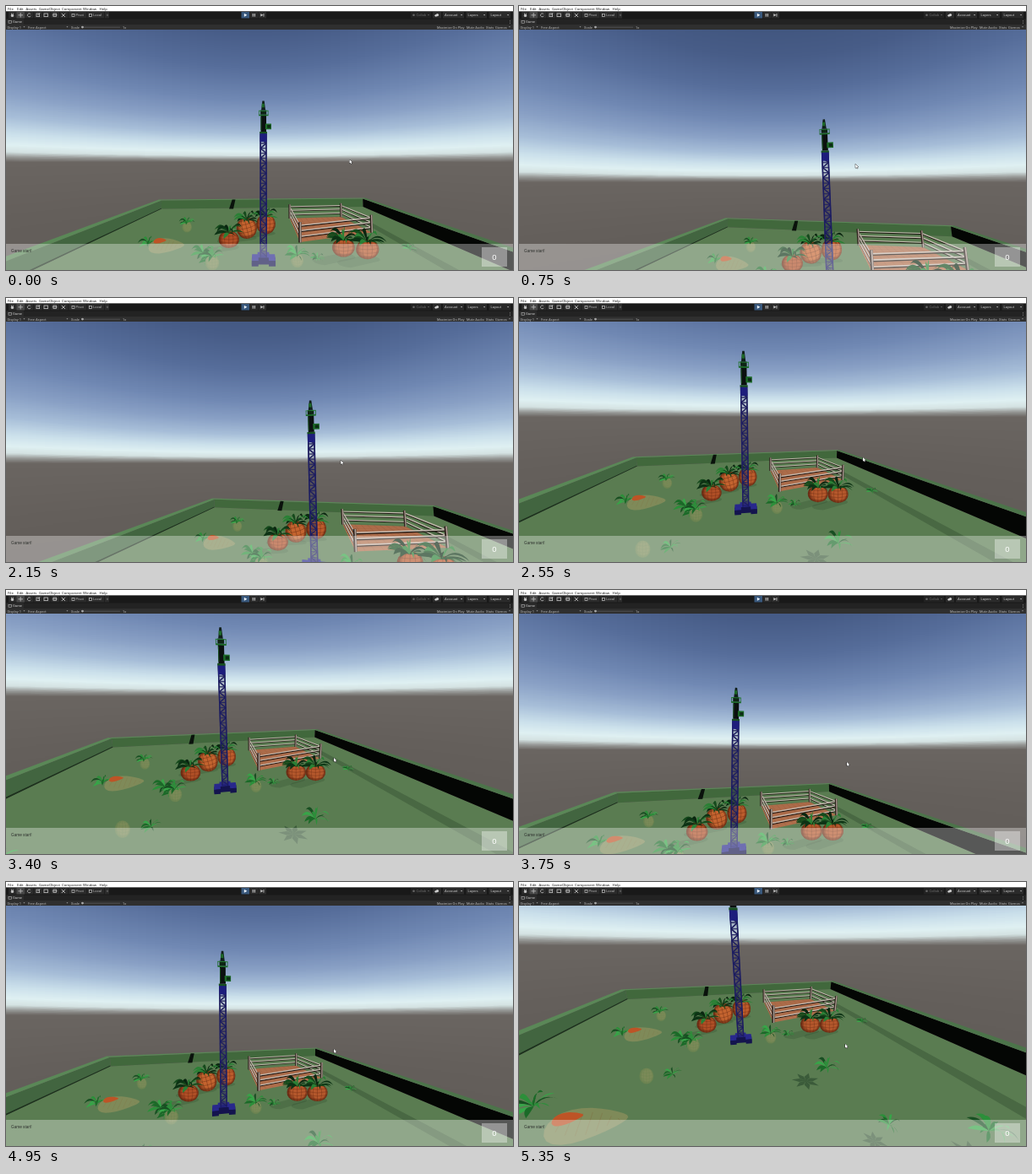
Write an HTML page with a canvas that moves like this. It is 600 px wide and 313 px high and loops after 5.4 s.

```html
<!DOCTYPE html>
<html lang="en">
<head>
<meta charset="utf-8">
<title>Crane game</title>
<style>
html, body { margin: 0; width: 100%; height: 100%; overflow: hidden; background: #191919; }
canvas { display: block; }
</style>
</head>
<body>
<canvas id="stage" width="600" height="313"></canvas>
<script>
const ctx = document.getElementById('stage').getContext('2d');
const LOOP = 5400, STEP = 50, TOP = 28;
const FOCAL = 246.8, CX = 300, CY = 170.5, EYE = 10, TAU = Math.PI * 2;
const RAD = Math.PI / 180;

// ---- motion ----
const times = [0, 1750, 2550, 3400, 4100, 4950, 5350];
const yaws = [0, -33.6, 8.7, 11, 11.2, 11, 10.5];
const pitches = [3.4, 17.2, -6.8, -10.2, 19, -2.9, -21.1];
const mouseX = [406.5, 385.5, 407, 388, 388, 388, 386];
const mouseY = [182, 196, 189, 199, 207, 198, 192];

function track(vals) {
  const last = times.length - 1;
  const rate = i => (vals[i + 1] - vals[i]) / (times[i + 1] - times[i]);
  const slope = vals.map((v, i) => {
    if (!i || i === last) return i ? rate(i - 1) : 0;
    const a = rate(i - 1), b = rate(i);
    return a * b <= 0 ? 0 : 2 * a * b / (a + b);
  });
  return t => {
    if (t >= times[last]) return vals[last];
    let i = 0;
    while (t >= times[i + 1]) i++;
    const h = times[i + 1] - times[i], u = (t - times[i]) / h, w = 1 - u;
    return vals[i] * (1 + 2 * u) * w * w + vals[i + 1] * u * u * (3 - 2 * u)
      + h * u * w * (slope[i] * w - slope[i + 1] * u);
  };
}
const yawAt = track(yaws), pitchAt = track(pitches);
const curX = track(mouseX), curY = track(mouseY);

// ---- camera ----
let sinY, cosY, sinP, cosP;
function aim(yaw, pitch) {
  sinY = Math.sin(yaw * RAD); cosY = Math.cos(yaw * RAD);
  sinP = Math.sin(pitch * RAD); cosP = Math.cos(pitch * RAD);
}
function toCam([x, y, z]) {
  const f = x * sinY + z * cosY, h = y - EYE;
  return [x * cosY - z * sinY, h * cosP - f * sinP, f * cosP + h * sinP];
}
const toScreen = c => [CX + FOCAL * c[0] / c[2], CY - FOCAL * c[1] / c[2]];
const project = p => toScreen(toCam(p));

function clipNear(pts) {
  const near = 0.3, out = [];
  pts.forEach((a, i) => {
    const b = pts[(i + 1) % pts.length];
    if (a[2] >= near) out.push(a);
    if ((a[2] >= near) !== (b[2] >= near)) {
      const k = (near - a[2]) / (b[2] - a[2]);
      out.push(a.map((v, j) => v + (b[j] - v) * k));
    }
  });
  return out;
}
function poly(pts, fill) {
  const c = clipNear(pts.map(toCam));
  if (c.length < 3) return;
  ctx.fillStyle = fill;
  ctx.beginPath();
  c.forEach(p => ctx.lineTo(...toScreen(p)));
  ctx.fill();
}
function line(a, b, width, color) {
  const ca = toCam(a), cb = toCam(b);
  if (ca[2] < 1 || cb[2] < 1) return;
  ctx.strokeStyle = color;
  ctx.lineWidth = width * FOCAL * 2 / (ca[2] + cb[2]);
  ctx.beginPath();
  ctx.moveTo(...toScreen(ca));
  ctx.lineTo(...toScreen(cb));
  ctx.stroke();
}

// ---- sky: elevation in degrees, then red, green, blue ----
const skyStops = [
  [-60, 84, 79, 75], [-10, 100, 95, 91], [0, 106, 101, 97], [0.9, 150, 152, 150],
  [1.8, 212, 226, 226], [3, 223, 240, 242], [5, 203, 224, 235], [8, 167, 190, 216],
  [12, 137, 160, 197], [17, 112, 136, 179], [25, 86, 109, 154], [33, 71, 92, 135],
  [50, 56, 76, 113], [90, 48, 64, 98]
];
const skyTable = Array.from({ length: 1501 }, (_, k) => {
  const e = k / 10 - 60;
  let i = 0;
  while (i < skyStops.length - 2 && e > skyStops[i + 1][0]) i++;
  const a = skyStops[i], b = skyStops[i + 1], u = (e - a[0]) / (b[0] - a[0]);
  return [1, 2, 3].map(j => a[j] + (b[j] - a[j]) * u);
});
const skyCanvas = document.createElement('canvas');
skyCanvas.width = 60;
skyCanvas.height = 285;
const skyCtx = skyCanvas.getContext('2d');
const skyData = skyCtx.createImageData(60, 285);

function drawSky() {
  const d = skyData.data;
  for (let y = 0, n = 0; y < 285; y++) {
    const b = (CY - TOP - y - 0.5) / FOCAL;
    for (let x = 0; x < 60; x++, n += 4) {
      const a = (x * 10 + 5 - CX) / FOCAL;
      const e = Math.asin((b * cosP + sinP) / Math.hypot(a, b, 1)) / RAD;
      const c = skyTable[Math.max(0, Math.min(1500, Math.round((e + 60) * 10)))];
      d[n] = c[0]; d[n + 1] = c[1]; d[n + 2] = c[2]; d[n + 3] = 255;
    }
  }
  skyCtx.putImageData(skyData, 0, 0);
  ctx.drawImage(skyCanvas, 0, TOP, 600, 285);
}

// ---- arena ----
const L = -21, R = 23.2, BACK_L = 45.3, BACK_R = 47.4, FRONT = -12, WALL = 1.8, THICK = 1.1;
const flat = (pts, y = 0) => pts.map(([x, z]) => [x, y, z]);
const upright = (x0, z0, x1, z1, y0, y1) =>
  [[x0, y0, z0], [x1, y0, z1], [x1, y1, z1], [x0, y1, z0]];

function drawArena() {
  const lo = L - THICK, ro = R + THICK, bl = BACK_L + THICK, br = BACK_R + THICK;
  poly(flat([[L, FRONT], [L, BACK_L], [R, BACK_R], [R, FRONT]]), '#5a7c51');
  poly(flat([[17.2, FRONT], [17.2, 40], [18.5, 40], [18.5, FRONT]]), 'rgba(20,45,25,.25)');
  poly(upright(L, BACK_L, R, BACK_R, 0, WALL), '#41683c');
  poly(upright(L, FRONT, L, BACK_L, 0, WALL), '#426540');
  poly(upright(L, FRONT, L, BACK_L, 0, 0.15), '#1c2f1c');
  poly(upright(R, FRONT, R, BACK_R, 0, WALL), '#040604');
  poly(flat([[lo, FRONT], [lo, bl], [L, BACK_L], [L, FRONT]], WALL), '#5a8857');
  poly(flat([[lo, bl], [ro, br], [R, BACK_R], [L, BACK_L]], WALL), '#5a8857');
  poly(flat([[ro, FRONT], [ro, br], [R, BACK_R], [R, FRONT]], WALL), '#4c744a');
  poly([[-6.5, 0, BACK_L], [-5.6, 0, BACK_L], [-5.3, WALL, bl], [-6, WALL, bl]], '#0a120c');
}

// soft shadows fall to the front left
function shade(x, z, r, h) {
  const pts = Array.from({ length: 14 }, (_, i) => {
    const a = i / 14 * TAU, far = Math.cos(a) < 0 ? h : 0;
    return [x + Math.cos(a) * r - far * 1.3, z + Math.sin(a) * r * 0.7 - far * 0.6];
  });
  poly(flat(pts), 'rgba(22,52,32,.18)');
}

// ---- plants ----
const bright = ['#2c8f3a', '#1b6a28', '#37a548', '#184f22'];
const deep = ['#154a1c', '#0a2610', '#2a8035', '#0d3315'];

function leaves(x, y, z, size, count, colors) {
  if (toCam([x, y, z])[2] < 1) return;
  const at = (a, r, up) => project([x + Math.cos(a) * r * size, y + up * size, z + Math.sin(a) * r * size]);
  const root = project([x, y, z]);
  for (let i = 0; i < count; i++) {
    const a = i * 2.4 + x, lift = 0.45 + 0.4 * Math.sin(i * 1.9 + z);
    ctx.fillStyle = colors[i % 4];
    ctx.beginPath();
    ctx.moveTo(...root);
    ctx.quadraticCurveTo(...at(a - 0.3, 0.6, lift + 0.3), ...at(a, 1, lift * 0.4 - 0.05));
    ctx.quadraticCurveTo(...at(a + 0.3, 0.55, lift), ...root);
    ctx.fill();
  }
}

function carrot({ x, z, r, tall = 1, tilt = 0, color = '#b5582c', dark = '#5a220e', top = 1.75, tint = deep }) {
  const c = toCam([x, r * 0.85 * tall, z]);
  if (c[2] < 1) return;
  const [sx, sy] = toScreen(c), s = r * FOCAL / c[2];
  ctx.save();
  ctx.translate(sx, sy);
  ctx.rotate(tilt);
  ctx.scale(s, s * tall);
  const g = ctx.createRadialGradient(0.3, -0.2, 0.1, 0, 0, 1.05);
  g.addColorStop(0, color);
  g.addColorStop(0.6, color);
  g.addColorStop(1, dark);
  ctx.fillStyle = g;
  ctx.beginPath();
  ctx.ellipse(0, 0, 1, 0.95, 0, 0, TAU);
  ctx.fill();
  ctx.clip();
  ctx.strokeStyle = dark;
  ctx.globalAlpha = 0.45;
  ctx.lineWidth = 0.06;
  for (let i = -2; i <= 2; i++) {
    ctx.beginPath();
    ctx.moveTo(-1, i * 0.36 - 0.1);
    ctx.quadraticCurveTo(0, i * 0.36 + 0.15, 1, i * 0.36 - 0.1);
    ctx.moveTo(i * 0.24, -1);
    ctx.quadraticCurveTo(i * 0.62, 0, i * 0.24, 1);
    ctx.stroke();
  }
  ctx.restore();
  if (top) leaves(x, r * 1.5 * tall, z, top, 13, tint);
}

function lying(x, z, len) {
  const ring = (cx, rx, ry, y) => Array.from({ length: 24 }, (_, i) => {
    const a = i / 24 * TAU, c = Math.cos(a), s = Math.sin(a) * (1 - 0.45 * c);
    return [cx + c * rx, y + s * ry, z + 0.1 * c + s * ry * 1.2];
  });
  poly(ring(x, len / 2, 0.55, 0.3), '#7f8a59');
  for (let i = -3; i < 4; i++) {
    const px = x + i * len / 8, h = 0.42 - 0.04 * i * (i + 1);
    line([px, 0.3 - h, z - h], [px + 0.15, 0.3 + h, z + h], 0.035, 'rgba(125,95,50,.4)');
  }
  poly(ring(x - len * 0.2, len * 0.17, 0.2, 0.85), '#bd5426');
}

const pale = { color: '#7b8a58', dark: '#64804f', tint: bright };
const fence = [[5.05, 26.6], [5.35, 37.6], [14.85, 38.6], [15.9, 30.2]];

function drawSide(a, b) {
  for (const y of [0.75, 1.45, 2.1]) {
    line([a[0], y - 0.14, a[1]], [b[0], y - 0.14, b[1]], 0.13, '#1e1612');
    line([a[0], y, a[1]], [b[0], y, b[1]], 0.15, '#c4bab0');
  }
}
function drawPost([x, z]) {
  line([x, 0, z], [x, 2.5, z], 0.38, '#2c211c');
  line([x + 0.07, 0, z], [x + 0.07, 2.5, z], 0.18, '#a99a90');
}
function drawFence() {
  poly(flat(fence, 0.05), '#b06f4c');
  const mix = (a, b, u) => [a[0] + (b[0] - a[0]) * u, 0.06, a[1] + (b[1] - a[1]) * u];
  const [fl, bl, br, fr] = fence;
  for (let u = 0.1; u < 1; u += 0.1) {
    line(mix(fl, bl, u), mix(fr, br, u), 0.05, 'rgba(90,45,30,.3)');
    line(mix(fl, fr, u), mix(bl, br, u), 0.05, 'rgba(90,45,30,.25)');
  }
  drawSide(bl, br);
  drawSide(fl, bl);
  drawSide(br, fr);
  drawPost(bl);
  drawPost(br);
  drawSide(fl, fr);
  drawPost(fl);
  drawPost(fr);
}

// ---- crane ----
const TX = 0.4, TZ = 21.4;
function slab(x0, x1, y0, y1, color, z = TZ) {
  poly(upright(TX + x0, z, TX + x1, z, y0, y1), color);
}
function block(x0, x1, z0, z1, h) {
  poly(flat([[TX + x0, TZ + z0], [TX + x1, TZ + z0], [TX + x1, TZ + z1], [TX + x0, TZ + z1]], h), '#28288c');
  slab(x0, x1, 0, h, '#14144e', TZ + z0);
}
function drawCrane() {
  block(-0.6, 0.6, 0.2, 1, 0.6);
  block(-1.15, 1.15, -0.4, 0.4, 0.65);
  block(-1.15, -0.5, -0.75, 0.1, 0.5);
  block(0.5, 1.15, -0.75, 0.1, 0.5);
  const bays = 24, lo = 0.6, step = (13 - lo) / bays, w = 0.3;
  slab(-w, w, lo, 13, 'rgba(30,30,70,.2)');
  for (const [dz, color] of [[0.6, '#3c3c5c'], [0, '#1c1c62']]) {
    const z = TZ + dz;
    for (let i = 0; i < bays; i++) {
      const y = lo + i * step, s = i % 2 ? w : -w;
      line([TX - s, y, z], [TX + s, y + step, z], 0.1, color);
      line([TX - w, y, z], [TX + w, y, z], 0.07, color);
    }
    for (const s of [-w, w]) line([TX + s, 0.5, z], [TX + s, 13, z], 0.12, color);
  }
  slab(-0.34, 0.34, 12.1, 13, '#1d1d7c');
  slab(-0.38, 0.38, 12.95, 13.15, '#17501f');
  slab(-0.27, 0.3, 13.15, 14.9, '#0b100f');
  slab(-0.27, -0.19, 13.3, 14.7, '#17501f');
  slab(0.2, 0.82, 13.4, 13.98, '#1c6a28');
  slab(0.4, 0.75, 13.52, 13.85, '#0d2c15');
  slab(-0.48, 0.52, 14.8, 14.95, '#1c6a28');
  slab(-0.48, -0.42, 14.9, 15.35, '#1c6a28');
  slab(0.46, 0.52, 14.9, 15.35, '#1c6a28');
  slab(-0.3, 0.32, 14.95, 15.4, '#0e2414');
  slab(-0.48, 0.52, 15.3, 15.38, '#237a30');
  poly([[TX - 0.22, 15.4, TZ], [TX + 0.22, 15.4, TZ], [TX + 0.1, 16.4, TZ], [TX - 0.1, 16.4, TZ]], '#10201a');
  slab(-0.16, 0.1, 15.7, 16.1, '#1f6a2a');
}

// ---- scene, far to near ----
const big = { r: 1.2, tall: 0.9 };
const carrots = [
  { x: -3.6, z: 25.1, ...big, color: '#b04f26' },
  { x: -1.7, z: 28.2, r: 1.35, tall: 1.1, tilt: -0.25, color: '#c4642f' },
  { x: 0.9, z: 30, r: 1.35, tall: 1.1, color: '#bd5c2c' },
  { x: 8.95, z: 22.8, ...big },
  { x: 11.25, z: 22.3, ...big }
];
const buried = [
  [-7.1, 15.2, 0.55, 0], [-4.4, 20, 0.65, 1.1], [-10.4, 30.5, 0.7, 1.1], [3.6, 20.5, 0.6, 1.2]
];
const sprouts = [
  [-6, 22.8, 1.3], [-5.3, 15.5, 0.7], [5.8, 21.5, 0.75], [16.8, 24, 0.8],
  [-13.2, 13.3, 1.2], [-13.2, 25.4, 1.1], [-5, 21.2, 1]
];
const casting = [[7.3, 14.1, 1.1], [8.3, 7.8, 0.65], [13.5, 6.4, 1.05]];
const scene = [
  { z: 32, draw: drawFence },
  { z: TZ, draw: drawCrane },
  { z: 24.9, draw: () => lying(-10.8, 24.9, 4) },
  { z: 11.1, draw: () => lying(-8.9, 11.1, 4.2) },
  ...carrots.map(c => ({ z: c.z, draw: () => carrot(c) })),
  ...buried.map(([x, z, r, top]) => ({ z, draw: () => carrot({ ...pale, x, z, r, tall: 1.2, top }) })),
  ...[...sprouts, ...casting].map(([x, z, s]) => ({ z, draw: () => leaves(x, 0.3, z, s, 11, bright) }))
].sort((a, b) => b.z - a.z);

function drawShadows() {
  carrots.forEach(c => shade(c.x, c.z, c.r, 1.8));
  casting.forEach(([x, z, s]) => {
    const px = x - 2 * s, pz = z - 0.9 * s;
    for (let i = 0; i < 7; i++) {
      const a = i * TAU / 7 + x, q = k => [px + Math.cos(a + k) * s * 0.5, pz + Math.sin(a + k) * s * 0.5];
      poly(flat([[px, pz], q(-0.4), [px + Math.cos(a) * s, pz + Math.sin(a) * s], q(0.4)]), 'rgba(22,52,32,.45)');
    }
  });
}

// ---- interface ----
function rect(x, y, w, h, fill) {
  ctx.fillStyle = fill;
  ctx.fillRect(x, y, w, h);
}
function text(str, x, y, size = 4.1, color = '#b4b4b4', family = 'Roboto, sans-serif') {
  ctx.font = size + 'px ' + family;
  ctx.fillStyle = color;
  ctx.fillText(str, x, y);
}
function tri(x, y, w, h, color) {
  ctx.fillStyle = color;
  ctx.beginPath();
  ctx.moveTo(x, y);
  ctx.lineTo(x + w, y + (w === h ? 0 : h / 2));
  ctx.lineTo(w === h ? x + w / 2 : x, y + (w === h ? h * 0.7 : h));
  ctx.fill();
}
function stroke(color, width, ...pts) {
  ctx.strokeStyle = color;
  ctx.lineWidth = width;
  ctx.beginPath();
  pts.forEach(p => ctx.lineTo(...p));
  ctx.stroke();
}
function dot(x, y, r, color) {
  ctx.fillStyle = color;
  ctx.beginPath();
  ctx.arc(x, y, r, 0, TAU);
  ctx.fill();
}

function drawTools() {
  const c = '#c0c0c0';
  rect(3, 7, 119, 7.5, '#2b2b2b');
  rect(12.5, 7, 9.5, 7.5, '#484848');
  dot(7.5, 11.4, 1.7, c);
  stroke(c, 0.8, [6.5, 11], [6.5, 8.6]);
  stroke(c, 0.8, [8.3, 11], [8.3, 8.6]);
  stroke(c, 0.8, [14.5, 10.8], [20, 10.8]);
  stroke(c, 0.8, [17.2, 8], [17.2, 13.5]);
  ctx.strokeStyle = c;
  ctx.lineWidth = 0.8;
  ctx.beginPath();
  ctx.arc(27.5, 10.8, 2, 0.5, 5.6);
  ctx.stroke();
  ctx.strokeRect(36, 9, 3.6, 3.6);
  stroke(c, 0.8, [37.5, 11], [40.2, 8.3]);
  ctx.strokeRect(45, 9, 4.5, 3.6);
  ctx.strokeRect(56, 9, 3.4, 3.4);
  stroke(c, 0.7, [54.8, 10.7], [60.6, 10.7]);
  stroke(c, 0.9, [65.8, 8.8], [70, 13]);
  stroke(c, 0.9, [70, 8.8], [65.8, 13]);
  for (const x of [32.5, 43, 52.5, 63, 73.5, 95.5, 116]) rect(x, 7, 0.7, 7.5, '#191919');
  ctx.strokeStyle = c;
  ctx.lineWidth = 0.7;
  ctx.strokeRect(78, 9.4, 3, 3);
  text('Pivot', 82.5, 11.2, 4.2);
  ctx.strokeRect(98.5, 9.4, 3, 3);
  text('Local', 103, 11.2, 4.2);
  dot(120, 10.8, 1.2, '#555');
}

function drawEditor() {
  rect(0, 0, 600, 6.5, '#fff');
  [['File', 2], ['Edit', 13], ['Assets', 23.5], ['GameObject', 39], ['Component', 66], ['Window', 91], ['Help', 110.5]]
    .forEach(([s, x]) => text(s, x, 3.4, 4.3, '#111', 'Open Sans, sans-serif'));
  rect(0, 6.5, 600, 9, '#191919');
  drawTools();
  rect(278.5, 7, 9.5, 7.5, '#39587c');
  rect(288.5, 7, 9.5, 7.5, '#2b2b2b');
  rect(298.5, 7, 9.5, 7.5, '#2b2b2b');
  tri(281.8, 8.8, 3.6, 4, '#e8f0f8');
  rect(291.7, 9, 1.1, 3.6, '#c8c8c8');
  rect(293.8, 9, 1.1, 3.6, '#c8c8c8');
  tri(301.3, 9, 3, 3.6, '#c8c8c8');
  rect(304.5, 9, 0.9, 3.6, '#c8c8c8');
  rect(479, 7, 24, 7.5, '#222');
  dot(482.5, 10.8, 1.3, '#666');
  text('Collab', 485.5, 11.2, 4.1, '#6c6c6c');
  tri(499, 10, 2, 2, '#666');
  rect(505, 7, 10, 7.5, '#2b2b2b');
  dot(508.8, 11.3, 1.4, '#ccc');
  dot(510.5, 10.6, 1.6, '#ccc');
  [['Account', 517, 25], ['Layers', 544.5, 24.5], ['Layout', 571.5, 25.5]].forEach(([s, x, w]) => {
    rect(x, 7, w, 7.5, '#2b2b2b');
    text(s, x + 2, 11.2, 4.2, '#c8c8c8');
    tri(x + w - 4, 10, 2.2, 2.2, '#bbb');
  });
  rect(0, 15.5, 600, 6.5, '#232323');
  rect(1, 15.5, 20, 6.5, '#2b2b2b');
  ctx.strokeStyle = '#bbb';
  ctx.lineWidth = 0.6;
  ctx.strokeRect(3, 17.6, 3.4, 2.6);
  text('Game', 8, 19.2, 4.2, '#c8c8c8');
  for (const y of [17.3, 18.9, 20.5]) dot(596.5, y, 0.45, '#bbb');
  rect(0, 22, 600, 6, '#2f2f2f');
  text('Display 1', 1.5, 25.3, 4.1);
  tri(20.5, 24.2, 2, 2, '#aaa');
  text('Free Aspect', 26, 25.3, 4.1);
  tri(71.5, 24.2, 2, 2, '#aaa');
  text('Scale', 77, 25.3, 4.1);
  rect(90, 24.8, 45, 0.6, '#666');
  dot(90.5, 25.1, 1.4, '#aaa');
  text('1x', 138, 25.3, 4.1);
  [['Maximize On Play', 510], ['Mute Audio', 545], ['Stats', 568], ['Gizmos', 579]]
    .forEach(([s, x]) => text(s, x, 25.3, 4.1));
  tri(595, 24.2, 2, 2, '#aaa');
}

function drawHud() {
  const sans = 'Liberation Sans, Arial, sans-serif';
  rect(0, 282, 600, 31, 'rgba(255,255,255,.33)');
  text('Game start!', 6, 291, 4.7, '#2c2f2c', sans);
  rect(563, 286, 30, 23, 'rgba(255,255,255,.36)');
  ctx.textAlign = 'center';
  text('0', 578, 298, 9.5, '#fff', sans);
  ctx.textAlign = 'left';
}

function drawCursor(x, y) {
  ctx.beginPath();
  [[0, 0], [0, 4.6], [1.1, 3.7], [1.9, 5.3], [2.6, 5], [1.9, 3.4], [3.3, 3.3]]
    .forEach(([dx, dy]) => ctx.lineTo(x + dx, y + dy));
  ctx.closePath();
  ctx.lineWidth = 0.9;
  ctx.strokeStyle = '#222';
  ctx.stroke();
  ctx.fillStyle = '#fff';
  ctx.fill();
}

function render(t) {
  aim(yawAt(t), pitchAt(t));
  ctx.textBaseline = 'middle';
  drawSky();
  ctx.save();
  ctx.beginPath();
  ctx.rect(0, TOP, 600, 285);
  ctx.clip();
  drawArena();
  drawShadows();
  scene.forEach(o => o.draw());
  ctx.restore();
  drawHud();
  drawEditor();
  drawCursor(curX(t), curY(t));
}

const start = performance.now();
let shown = -1;
function tick() {
  const t = Math.floor((performance.now() - start) % LOOP / STEP) * STEP;
  if (t !== shown) render(shown = t);
  requestAnimationFrame(tick);
}
tick();
</script>
</body>
</html>
```
